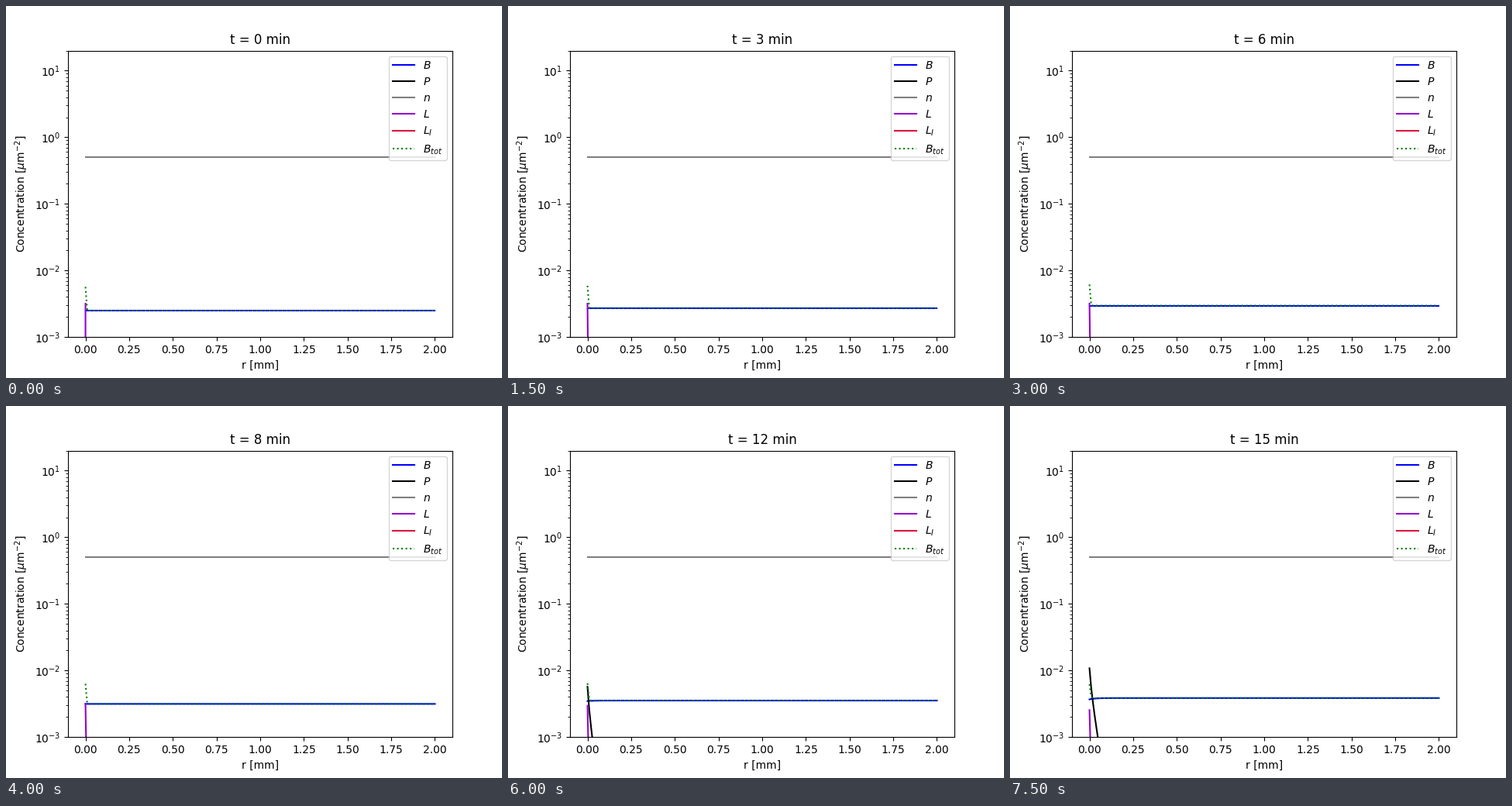
Write a matplotlib script that moves like this. It is 640 px wide and 480 px high and loops after 8000 ms.

```python
import numpy as np
import matplotlib.pyplot as plt
from matplotlib.animation import FuncAnimation

MINUTES = 16
R = np.linspace(0, 2, 201)  # mm
CELL = np.arange(R.size)
B0 = 0.0025
L0 = 1 / (np.pi * 10**2)
GROWTH = np.log(2) / 24


def nutrient(t):
    return np.full_like(R, 0.5)


def bacteria(t):
    dip = 0.045 * (max(t - 7, 0) / 8) ** 2
    return B0 * np.exp(GROWTH * t) * (1 - dip * np.exp(-R / 0.03))


def phage(t):
    s = t - 10
    peak = max(2.8 + 1.35 * s + 0.05 * s**2, 0) * 1e-3
    width = 0.0118 + 0.00085 * s
    return peak * np.exp(-((R / width) ** 0.8))


def infected(t):
    core = L0 * (1 - 0.2 * (max(t - 6, 0) / 9) ** 2.5)
    spread = 1.3e-6 * t**2 / core
    return core * spread**CELL


def late(t):
    return np.zeros_like(R)


def total(t):
    return bacteria(t) + infected(t) + late(t)


SERIES = [
    (bacteria, "$B$", "mediumblue", "-"),
    (phage, "$P$", "black", "-"),
    (nutrient, "$n$", "gray", "-"),
    (infected, "$L$", "darkviolet", "-"),
    (late, "$L_I$", "crimson", "-"),
    (total, "$B_{tot}$", "green", ":"),
]
SERIES[0] = (bacteria, "$B$", "blue", "-")

fig, ax = plt.subplots(figsize=(6.4, 4.8), dpi=100)
lines = [
    ax.semilogy(R, f(0), ls, color=color, label=label)[0]
    for f, label, color, ls in SERIES
]
ax.set_xlim(-0.1, 2.1)
ax.set_ylim(1e-3, 20)
ax.set_xlabel("r [mm]")
ax.set_ylabel(r"Concentration [$\mu$m$^{-2}$]")
ax.legend(loc="upper right")
title = ax.set_title("t = 0 min")


def update(t):
    for line, (f, *_) in zip(lines, SERIES):
        line.set_ydata(f(t))
    title.set_text(f"t = {t} min")
    return [*lines, title]


anim = FuncAnimation(fig, update, frames=MINUTES, interval=500, repeat=True,
                     repeat_delay=0)
plt.show()
```
